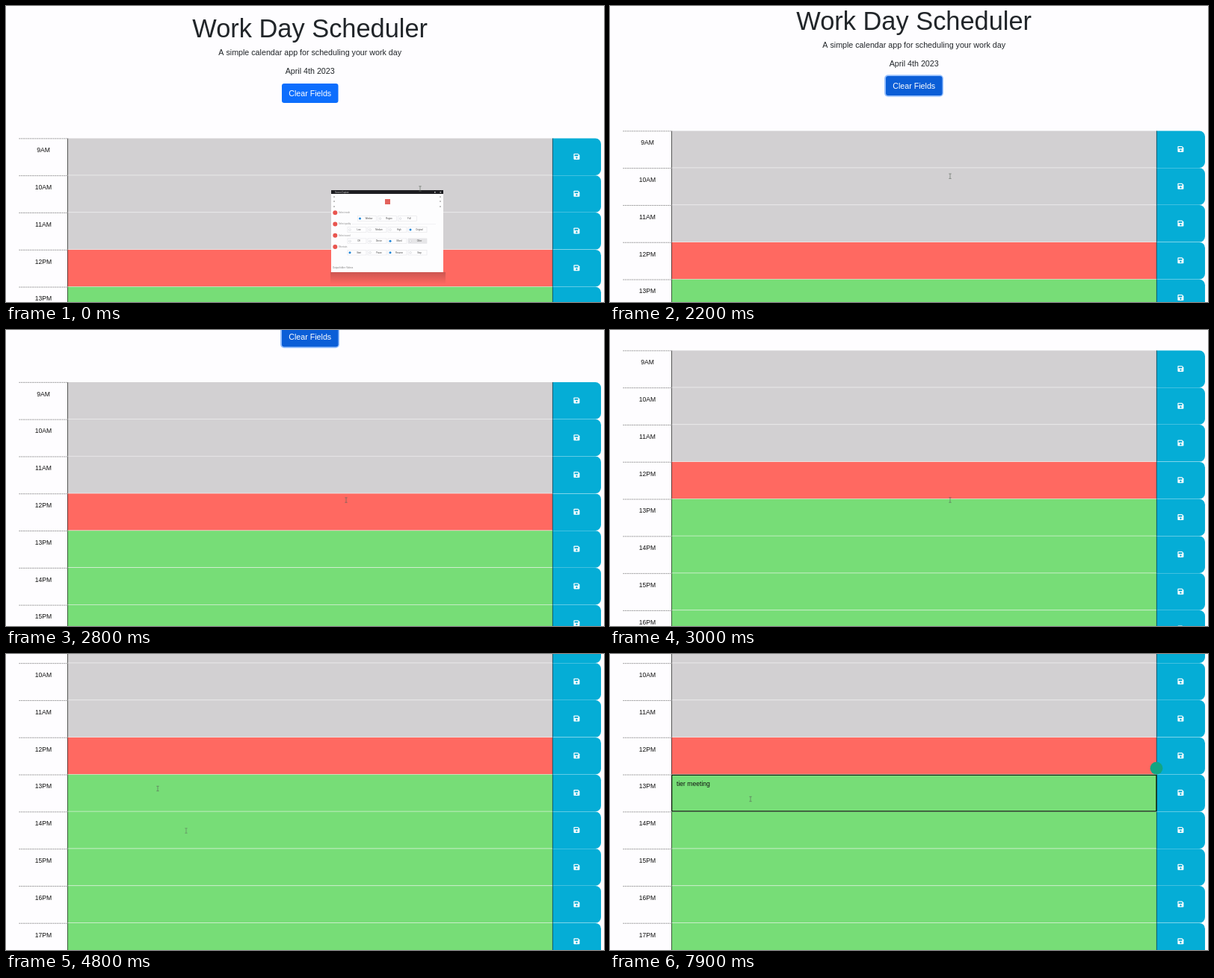
An HTML page with a canvas that plays this animation: 800x397 px, repeating every 8 s.

```html
<!DOCTYPE html>
<html lang="en">
<head>
<meta charset="utf-8">
<title>Work Day Scheduler</title>
<style>
html, body { margin: 0; width: 100%; height: 100%; overflow: hidden; background: #fefdff; }
canvas { display: block; width: 800px; height: 397px; }
</style>
</head>
<body>
<canvas id="stage"></canvas>
<script>
const W = 800, H = 397, LOOP = 8000, STEP = 100;
const FONT = '"Liberation Sans", Arial, sans-serif';
const PAGE = '#fefdff', INK = '#212529';
const GRAY = '#d2d0d2', RED = '#ff6961', GREEN = '#77dd77', CYAN = '#05add6';
const ROW_TOP = 177.5, ROW_H = 49.8, LEFT = 82, RIGHT = 731;
const NOTE = 'tier meeting';

const canvas = document.getElementById('stage');
const ctx = canvas.getContext('2d');
const dpr = window.devicePixelRatio || 1;
canvas.width = W * dpr;
canvas.height = H * dpr;

// [time, value...]
const scrollKeys = [
  [2100, 0], [2200, 10], [2300, 33], [2400, 43], [2600, 43], [2700, 75],
  [2800, 107.5], [2900, 129], [3000, 150], [3200, 172], [3600, 172], [3900, 215]
];
const cursorKeys = [
  [0, 554, 245], [300, 412, 120], [500, 412, 120], [900, 455, 228.5], [3200, 455, 228],
  [3400, 425, 231], [3500, 248, 258.5], [3800, 241, 237], [4700, 241, 237],
  [4800, 203, 180.5], [5300, 190, 203], [5400, 188, 194.5]
];
// Cursor traces left on screen for a while: [from, to, x, y]
const traces = [[3500, 3600, 425, 230.5], [4800, 5300, 241, 237]];

function at(keys, t) {
  if (t <= keys[0][0]) return keys[0].slice(1);
  for (let i = 1; i < keys.length; i++) {
    const a = keys[i - 1], b = keys[i];
    if (t <= b[0]) {
      const k = (t - a[0]) / (b[0] - a[0]);
      return a.slice(1).map((v, j) => v + (b[j + 1] - v) * k);
    }
  }
  return keys[keys.length - 1].slice(1);
}

function rect(x, y, w, h, color) {
  ctx.fillStyle = color;
  ctx.fillRect(x, y, w, h);
}

function round(x, y, w, h, r, color) {
  ctx.fillStyle = color;
  ctx.beginPath();
  ctx.roundRect(x, y, w, h, r);
  ctx.fill();
}

function dot(x, y, r, color) {
  ctx.fillStyle = color;
  ctx.beginPath();
  ctx.arc(x, y, r, 0, Math.PI * 2);
  ctx.fill();
}

function text(str, x, y, size, color = INK, align = 'center') {
  ctx.font = size + 'px ' + FONT;
  ctx.textAlign = align;
  ctx.fillStyle = color;
  ctx.fillText(str, x, y);
}

function header(s, pressed) {
  text('Work Day Scheduler', 406.7, 41.5 - s, 34.4);
  text('A simple calendar app for scheduling your work day', 406.7, 66.3 - s, 10.7);
  text('April 4th 2023', 406.7, 91.2 - s, 10.7);
  if (pressed) round(367, 102.2 - s, 79, 29.6, 5, '#98c1fe');
  round(369, 104 - s, 75.5, 26, 3.2, pressed ? '#0b5ed7' : '#0d6efd');
  text('Clear Fields', 406.7, 120.6 - s, 10.7, '#fff');
}

function saveIcon(x, y) {
  ctx.fillStyle = '#fff';
  ctx.beginPath();
  ctx.moveTo(x - 3.2, y - 4);
  ctx.lineTo(x + 2, y - 4);
  ctx.lineTo(x + 4, y - 2);
  ctx.lineTo(x + 4, y + 3.2);
  ctx.quadraticCurveTo(x + 4, y + 4, x + 3.2, y + 4);
  ctx.lineTo(x - 3.2, y + 4);
  ctx.quadraticCurveTo(x - 4, y + 4, x - 4, y + 3.2);
  ctx.lineTo(x - 4, y - 3.2);
  ctx.quadraticCurveTo(x - 4, y - 4, x - 3.2, y - 4);
  ctx.fill();
  rect(x - 2.8, y - 2.8, 4.8, 2.2, CYAN);
  dot(x, y + 1.7, 1.2, CYAN);
}

function row(i, s) {
  const y = ROW_TOP + ROW_H * i - s;
  const end = y + ROW_H;
  if (end < 0 || y > H) return;
  const hour = 9 + i;
  ctx.strokeStyle = '#444';
  ctx.lineWidth = 0.7;
  ctx.setLineDash([1.3, 1.1]);
  ctx.beginPath();
  ctx.moveTo(17.5, y + 0.35);
  ctx.lineTo(LEFT, y + 0.35);
  ctx.stroke();
  ctx.setLineDash([]);
  text(hour + (hour < 12 ? 'AM' : 'PM'), 50, y + 18.6, 8.6, '#111');

  rect(LEFT, y, RIGHT - LEFT, ROW_H, hour < 12 ? GRAY : hour === 12 ? RED : GREEN);
  rect(LEFT, end - 0.7, RIGHT - LEFT, 0.7, '#f5f5f5');
  rect(LEFT + 0.1, y, 0.7, ROW_H, '#222');
  round(RIGHT, y, 65, ROW_H - 0.3, [0, 7.5, 7.5, 0], CYAN);
  rect(RIGHT - 0.1, y, 0.7, ROW_H, '#17333b');
  saveIcon(763.4, y + 24.4);
}

function focusBox(s, t) {
  const y = ROW_TOP + ROW_H * 4 - s;
  ctx.strokeStyle = '#0c1a0c';
  ctx.lineWidth = 1.3;
  ctx.beginPath();
  ctx.roundRect(LEFT + 0.6, y + 0.65, RIGHT - LEFT - 0.6, ROW_H - 1.3, 1);
  ctx.stroke();
  const typed = t < 6100 ? 0 : Math.floor((t - 6100) / 140) + 1;
  text(NOTE.slice(0, typed), 89, y + 15, 8.6, '#111', 'left');
  if (t >= 5800) dot(731, y - 8.5, 8.4, '#12a583');
}

function beam(x, y, color) {
  ctx.strokeStyle = color;
  ctx.lineWidth = 0.8;
  ctx.beginPath();
  for (const d of [-3.2, 3.2]) {
    ctx.moveTo(x - 1.7, y + d);
    ctx.lineTo(x + 1.7, y + d);
  }
  ctx.moveTo(x, y - 3.2);
  ctx.lineTo(x, y + 3.2);
  ctx.stroke();
}

function arrow(x, y) {
  ctx.beginPath();
  ctx.moveTo(x, y);
  ctx.lineTo(x, y + 9);
  ctx.lineTo(x + 2.2, y + 7);
  ctx.lineTo(x + 6, y + 6.5);
  ctx.closePath();
  ctx.fillStyle = '#fff';
  ctx.fill();
  ctx.strokeStyle = '#222';
  ctx.lineWidth = 0.7;
  ctx.stroke();
}

function options(y, xs, words, chosen) {
  words.forEach((word, i) => {
    const x = xs + i * 27;
    ctx.strokeStyle = '#e4e4e8';
    ctx.lineWidth = 0.6;
    ctx.strokeRect(x - 3, y - 3.3, 25, 6.6);
    dot(x, y, 1.5, chosen.includes(i) ? '#1f86d8' : '#c9ccd2');
    if (!chosen.includes(i)) dot(x, y, 1, '#fff');
    text(word, x + 12, y + 1, 2.7, '#444');
  });
}

function recorder() {
  const glow = ctx.createLinearGradient(0, 357, 0, 373);
  glow.addColorStop(0, 'rgba(110,50,50,.35)');
  glow.addColorStop(1, 'rgba(110,50,50,0)');
  rect(434, 357, 154, 16, glow);
  rect(435, 247, 150, 110, '#fdfdfe');
  rect(435, 247, 150, 5, '#1d1d21');
  text('Screen Capture', 440, 250.7, 2.7, '#ddd', 'left');
  rect(573, 249, 1.6, 1.6, '#bbb');
  rect(580.5, 249, 1.6, 1.6, '#bbb');
  rect(507, 259, 7, 7, '#e2625c');
  for (const y of [256, 262, 269]) {
    dot(439, y, 0.8, '#777');
    dot(581, y, 0.8, '#777');
  }
  ['Select mode', 'Select quality', 'Select sound', 'Shortcuts'].forEach((label, i) => {
    const y = 277.3 + i * 15.2;
    dot(440.3, y, 3, '#e9554f');
    text(label, 445, y + 0.9, 2.7, '#888', 'left');
  });
  rect(463, 292.5, 112, 0.5, '#e6e6ea');
  options(285, 473.5, ['Window', 'Region', 'Full'], [0]);
  options(300, 460, ['Low', 'Medium', 'High', 'Original'], [3]);
  rect(538, 311.8, 25, 6.6, '#e6e6e8');
  options(315.2, 460, ['Off', 'Device', 'Mixed', 'Other'], [2]);
  options(330.7, 460, ['Start', 'Pause', 'Resume', 'Stop'], [0, 2]);
  text('Output folder: Videos', 437, 352, 2.9, '#777', 'left');
}

function draw(t) {
  const [s] = at(scrollKeys, t);
  const [x, y] = at(cursorKeys, t);
  ctx.setTransform(dpr, 0, 0, dpr, 0, 0);
  rect(0, 0, W, H, PAGE);
  header(s, t >= 500);
  for (let i = 0; i < 9; i++) row(i, s);
  if (t >= 5700) focusBox(s, t);
  if (t < 100) recorder();
  for (const [from, to, tx, ty] of traces) {
    if (t >= from && t < to) beam(tx, ty, 'rgba(90,100,90,.6)');
  }
  if (y < ROW_TOP - s) arrow(x, y);
  else beam(x, y, 'rgba(90,100,90,.75)');
}

const start = performance.now();
function tick() {
  const t = (performance.now() - start) % LOOP;
  draw(Math.floor(t / STEP) * STEP);
  requestAnimationFrame(tick);
}
tick();
</script>
</body>
</html>
```
